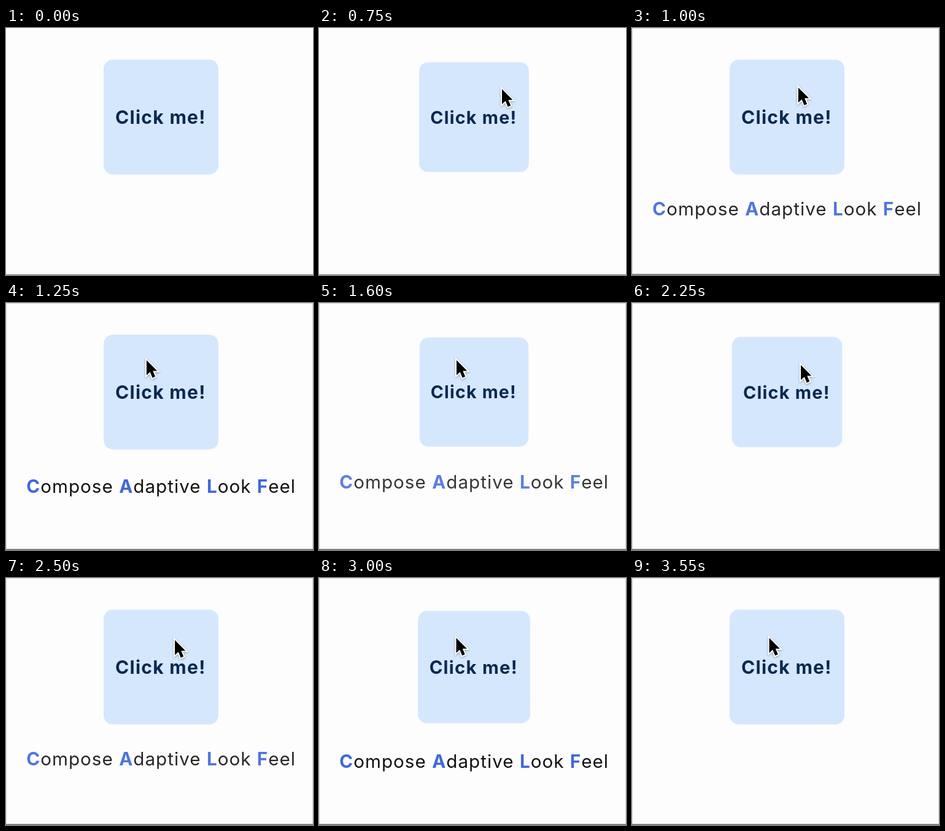
Animation, 500 px wide and 402 px high, one loop 3600 ms. Source, as an HTML page:

```html
<!DOCTYPE html>
<html lang="en">
<head>
<meta charset="utf-8">
<title>Click me</title>
<style>
  html, body { margin: 0; width: 100%; height: 100%; overflow: hidden; background: #fdfdfd; }
  svg { display: block; width: 500px; height: 402px; }
  text { font-family: Inter, Roboto, sans-serif; white-space: pre; }
  #label { font-size: 30px; font-weight: 700; letter-spacing: 1.3px; fill: #0a2850; }
  #caption { font-size: 29.6px; letter-spacing: 1.03px; fill: #111; }
  #caption tspan { font-weight: 700; fill: #4068dc; }
  #pointer { filter: drop-shadow(0 1.5px 1.5px rgba(0, 0, 0, .35)); }
</style>
</head>
<body>
<svg viewBox="0 0 500 402">
  <defs>
    <clipPath id="reveal"><rect x="0" y="276" width="500" height="60"/></clipPath>
  </defs>
  <rect width="500" height="402" fill="#fdfdfd"/>
  <rect y="401" width="500" height="1" fill="#777"/>
  <g id="frame">
    <path d="M.5 400V.5H499.5V400" fill="none" stroke="#d0d0d0"/>
    <rect y="400" width="500" height="1" fill="#999"/>
  </g>
  <g id="button">
    <rect x="159" y="51.5" width="187" height="187" rx="15" fill="#d5e7fd"/>
    <text id="label" x="178" y="156">Click me!</text>
  </g>
  <g clip-path="url(#reveal)">
    <text id="caption" x="33.3" y="309"><tspan>C</tspan>ompose <tspan>A</tspan>daptive <tspan>L</tspan>ook <tspan>F</tspan>eel</text>
  </g>
  <g id="pointer">
    <path d="M0 0V24.5L5.7 19.2L9.6 28.8L14.2 26.8L10.3 17.4H17.4Z" fill="#000"
          stroke="#fff" stroke-width="4" stroke-miterlimit="8" paint-order="stroke"/>
  </g>
</svg>
<script>
  const LOOP = 3600, STEP = 50, LINE = 44, PRESSED = 0.9;
  const $ = id => document.getElementById(id);
  const frame = $('frame'), button = $('button'), caption = $('caption'), pointer = $('pointer');

  // Each click: press time, release time; the release toggles the caption.
  const clicks = [[711, 800], [1480, 1565], [2215, 2302], [2977, 3050]];

  // Pointer path: time, x, y
  const path = [
    [50, 388, 242], [150, 273, 114], [300, 273, 114], [500, 298, 99.5],
    [850, 298, 99.5], [1200, 229, 93], [1850, 221.5, 93], [2200, 275, 101],
    [2550, 275, 101], [2950, 223.5, 97.5], [LOOP, 223.5, 97.5]
  ];

  // Critically damped spring from 0 to 1
  function spring(ms, stiffness) {
    const x = Math.sqrt(stiffness) * Math.max(0, ms) / 1000;
    return 1 - (1 + x) * Math.exp(-x);
  }

  function follow(start, changes, t, stiffness) {
    let value = start;
    changes.forEach(([at, target], i) => {
      if (t < at) return;
      const next = changes[i + 1];
      const end = next ? Math.min(t, next[0]) : t;
      value += (target - value) * spring(end - at, stiffness);
    });
    return value;
  }

  const presses = clicks.flatMap(([down, up]) => [[down, PRESSED], [up, 1]]);
  const toggles = clicks.map(([, up], i) => [up, i % 2 ? 0 : 1]);

  function pointerAt(t) {
    const i = Math.max(1, path.findIndex(p => p[0] > t));
    const [t0, x0, y0] = path[i - 1], [t1, x1, y1] = path[i];
    const k = Math.min(1, Math.max(0, (t - t0) / (t1 - t0)));
    const e = k * k * (3 - 2 * k);
    return [x0 + (x1 - x0) * e, y0 + (y1 - y0) * e];
  }

  function draw(t) {
    const scale = follow(1, presses, t, 1500);
    button.setAttribute('transform', `translate(252.5 145) scale(${scale}) translate(-252.5 -145)`);

    const shown = follow(0, toggles, t, 400);
    caption.setAttribute('transform', `translate(0 ${-LINE * (1 - shown)})`);
    caption.setAttribute('opacity', shown);

    pointer.setAttribute('transform', `translate(${pointerAt(t)})`);
    pointer.style.display = t < path[0][0] ? 'none' : '';
    frame.style.display = t < 800 ? 'none' : '';
  }

  const begin = performance.now();
  function tick() {
    const t = (performance.now() - begin) % LOOP;
    draw(Math.floor(t / STEP) * STEP);
    requestAnimationFrame(tick);
  }
  tick();
</script>
</body>
</html>
```
